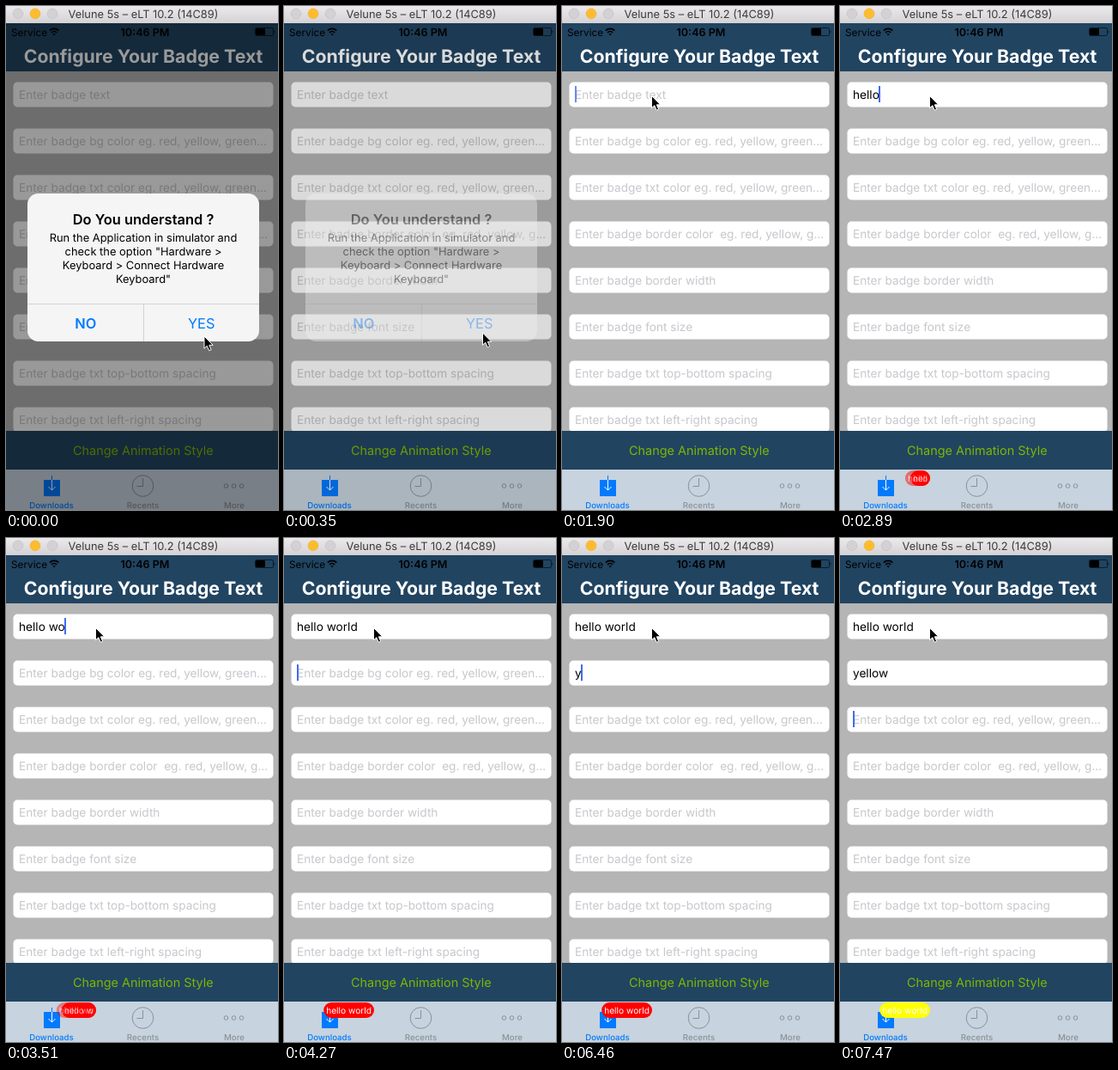
Animation of 317x586 px, one loop 8000 ms. Source, as an HTML page:

```html
<!DOCTYPE html>
<html lang="en">
<head>
<meta charset="utf-8">
<title>Badge text</title>
<style>
  html, body { margin: 0; width: 100%; height: 100%; overflow: hidden; }
  svg { display: block; width: 317px; height: 586px; }
  text {
    font-family: Inter, Roboto, sans-serif;
    font-optical-sizing: none;
    text-rendering: geometricPrecision;
    white-space: pre;
  }
  .mid { text-anchor: middle; }
  .input { font-size: 13.65px; }
  .hint { fill: #c7c7cd; }
  .tab { font-size: 9.7px; font-weight: 500; fill: #8b9196; }
  .msg { font-size: 12.9px; }
  .btn { font-size: 16.4px; fill: #007aff; }
  .badge text { font-size: 10.2px; fill: #fff; }
</style>
</head>
<body>
<svg viewBox="0 0 317 586">
  <defs>
    <linearGradient id="chrome" x2="0" y2="1">
      <stop stop-color="#ebe9eb"/><stop offset="1" stop-color="#d4d2d4"/>
    </linearGradient>
  </defs>
  <rect width="317" height="586" fill="#b5b5b5"/>
  <g id="fields"></g>
  <rect id="caret" width="2" height="19" fill="#426bf2"/>

  <!-- navigation bar -->
  <rect y="20" width="317" height="56" fill="#214461"/>
  <text x="6" y="34.6" font-size="11.8">Service</text>
  <g fill="none" stroke="#000" stroke-width="1.7">
    <path d="M50.9 28.6a7.4 7.4 0 0 1 10.4 0M53 31a4.4 4.4 0 0 1 6.2 0"/>
    <path d="M54.4 32.3L56.1 34.4L57.8 32.3Z" fill="#000" stroke="none"/>
  </g>
  <text class="mid" x="162" y="34.6" font-size="12.6" font-weight="600">10:46 PM</text>
  <rect x="290.5" y="25.5" width="21" height="9" rx="1.8" fill="none" stroke="#000" stroke-opacity=".6"/>
  <rect x="291" y="26" width="11" height="8" rx="1"/>
  <path d="M312.600 28.300q1.700 1.700 0 3.400z"/>
  <text class="mid" x="160" y="66" font-size="21.3" font-weight="700" fill="#fff">Configure Your Badge Text</text>

  <!-- bottom bars -->
  <rect y="494" width="317" height="45" fill="#214461"/>
  <text class="mid" x="159.800" y="522" font-size="14.45" fill="#7cb800">Change Animation Style</text>
  <rect y="539" width="317" height="47" fill="#c7d3de"/>
  <rect x="44" y="551" width="19" height="19" fill="#007aff"/>
  <path d="M53.500 546v5" stroke="#007aff"/>
  <path d="M53.500 551v12M49.500 559l4 4 4-4" fill="none" stroke="#fff"/>
  <g fill="none" stroke="#8b9196">
    <circle cx="159.500" cy="558" r="12.300"/>
    <path d="M159.500 549v9.500h-7"/>
    <circle cx="256.500" cy="558" r="2.300"/>
    <circle cx="265.500" cy="558" r="2.300"/>
    <circle cx="274.500" cy="558" r="2.300"/>
  </g>
  <text class="tab mid" x="53" y="584.300" style="fill:#007aff">Downloads</text>
  <text class="tab mid" x="159.500" y="584.300">Recents</text>
  <text class="tab mid" x="266" y="584.300">More</text>
  <g class="badge"><rect y="540" height="18" rx="9"/><text class="mid" y="552.700"></text></g>
  <g class="badge"><rect y="540" height="18" rx="9"/><text class="mid" y="552.700"></text></g>

  <!-- alert -->
  <rect id="dim" y="20" width="317" height="566" fill-opacity=".4"/>
  <g id="alert">
    <rect x="25" y="218" width="270" height="172" rx="12.500" fill="#f5f5f5"/>
    <path d="M25 346.500h270M160.500 346.500V390" stroke="#d2d2d5"/>
    <text class="mid" x="160" y="254" font-size="16.45" font-weight="600">Do You understand ?</text>
    <text class="msg mid" x="160" y="274">Run the Application in simulator and</text>
    <text class="msg mid" x="160" y="290">check the option "Hardware &gt;</text>
    <text class="msg mid" x="160" y="306">Keyboard &gt; Connect Hardware</text>
    <text class="msg mid" x="160" y="322">Keyboard"</text>
    <text class="btn mid" x="92.800" y="374.500" font-weight="600">NO</text>
    <text class="btn mid" x="227.700" y="374.500">YES</text>
  </g>

  <!-- window title bar -->
  <rect width="317" height="20" fill="url(#chrome)"/>
  <g stroke-width=".7">
    <circle cx="14" cy="8.800" r="5.900" fill="#d3d1d3" stroke="#c4c2c4"/>
    <circle cx="34" cy="8.800" r="5.900" fill="#fdbc2f" stroke="#f2b02c"/>
    <circle cx="54" cy="8.800" r="5.900" fill="#d3d1d3" stroke="#c4c2c4"/>
  </g>
  <text class="mid" x="160" y="14" font-size="12.85" fill="#3c3c3c">Velune 5s – eLT 10.2 (14C89)</text>

  <path id="cursor" d="M0 0V14.200L3.300 11.200L5.700 16.700L8.100 15.700L5.800 10.300H10.200Z" stroke="#fff"/>
</svg>
<script>
const LOOP = 8000, ROW = 54, LEFT = 15;
const $ = id => document.getElementById(id);
const hints = ['text', 'bg color eg. red, yellow, green...', 'txt color eg. red, yellow, green...',
  'border color  eg. red, yellow, g...', 'border width', 'font size',
  'txt top-bottom spacing', 'txt left-right spacing'];

$('fields').innerHTML = hints.map((hint, i) => `<g transform="translate(0 ${i * ROW})">
  <rect x="8.5" y="88.5" width="303" height="29" rx="4.800" fill="#fff"/>
  <text class="input" x="${LEFT}" y="107.800"></text></g>`).join('');
const inputs = [...document.querySelectorAll('.input')];
const badges = [...document.querySelectorAll('.badge')];

// Typed words with the time of each key
const words = [
  { text: 'hello world', keys: [2080, 2250, 2490, 2660, 2830, 3110, 3340, 3460, 3580, 3700, 3820] },
  { text: 'yellow', keys: [6460, 6520, 6700, 6820, 7000, 7170] }
];
// [time, opacity] and [time, x, y]
const caretStops = [[0, 0], [1249, 0], [1250, 1], [1850, 1], [2070, 0], [2080, 1], [4209, 1], [4210, 0],
  [4269, 0], [4270, 1], [4830, 1], [5040, 0], [5300, 0], [5450, 1], [5780, 1], [5980, 0],
  [6300, 0], [6450, 1], [LOOP, 1]];
const cursorStops = [[0, 231, 384], [60, 231, 384], [350, 231.5, 380], [840, 104, 114],
  [950, 104.5, 104.5], [LOOP, 104.5, 104.5]];

const linear = p => p;
const smooth = p => p * p * (3 - 2 * p);

function track(stops, t, ease = linear) {
  const i = stops.findIndex(s => s[0] > t);
  const a = stops[i - 1], b = stops[i];
  const p = ease((t - a[0]) / (b[0] - a[0]));
  return a.slice(1).map((v, k) => v + (b[k + 1] - v) * p);
}

const typed = (word, t) => word ? word.text.slice(0, word.keys.filter(k => k <= t).length) : '';

function setText(el, text) {
  if (el.textContent !== text) el.textContent = text;
}

function drawBadge(badge, text, fill, opacity) {
  const [box, label] = badge.children;
  badge.setAttribute('opacity', text ? opacity : 0);
  setText(label, text);
  const width = Math.max(18, label.getComputedTextLength() + 6);
  box.setAttribute('x', 105 - width);
  box.setAttribute('width', width);
  box.setAttribute('fill', fill);
  label.setAttribute('x', 105 - width / 2);
}

function draw(t) {
  inputs.forEach((el, i) => {
    const value = typed(words[i], t);
    setText(el, value || 'Enter badge ' + hints[i]);
    el.classList.toggle('hint', !value);
  });

  const row = t < 4240 ? 0 : t < 7470 ? 1 : 2;
  const offset = typed(words[row], t) ? Math.round(inputs[row].getComputedTextLength() - 1) : 0;
  $('caret').setAttribute('x', LEFT + offset);
  $('caret').setAttribute('y', 93 + row * ROW);
  $('caret').setAttribute('opacity', track(caretStops, t)[0]);

  // Each new badge fades in over the previous one
  const value = typed(words[0], t);
  const fill = t < 7170 ? '#f00' : '#ff0';
  const age = t - words[0].keys[value.length - 1];
  const fade = Math.min(1, age / 125) || 0;
  drawBadge(badges[0], value.slice(0, -1), fill, fade < 1 ? 1 : 0);
  drawBadge(badges[1], value, fill, fade);

  // Critically damped spring
  const x = Math.max(0, t - 60) * .0074;
  const shown = t < 840 ? (1 + x) * Math.exp(-x) : 0;
  $('dim').setAttribute('opacity', shown);
  $('alert').setAttribute('opacity', shown);

  $('cursor').setAttribute('transform', `translate(${track(cursorStops, t, smooth)})`);
}

const start = performance.now();
function tick() {
  draw((performance.now() - start) % LOOP);
  requestAnimationFrame(tick);
}
tick();
</script>
</body>
</html>
```
